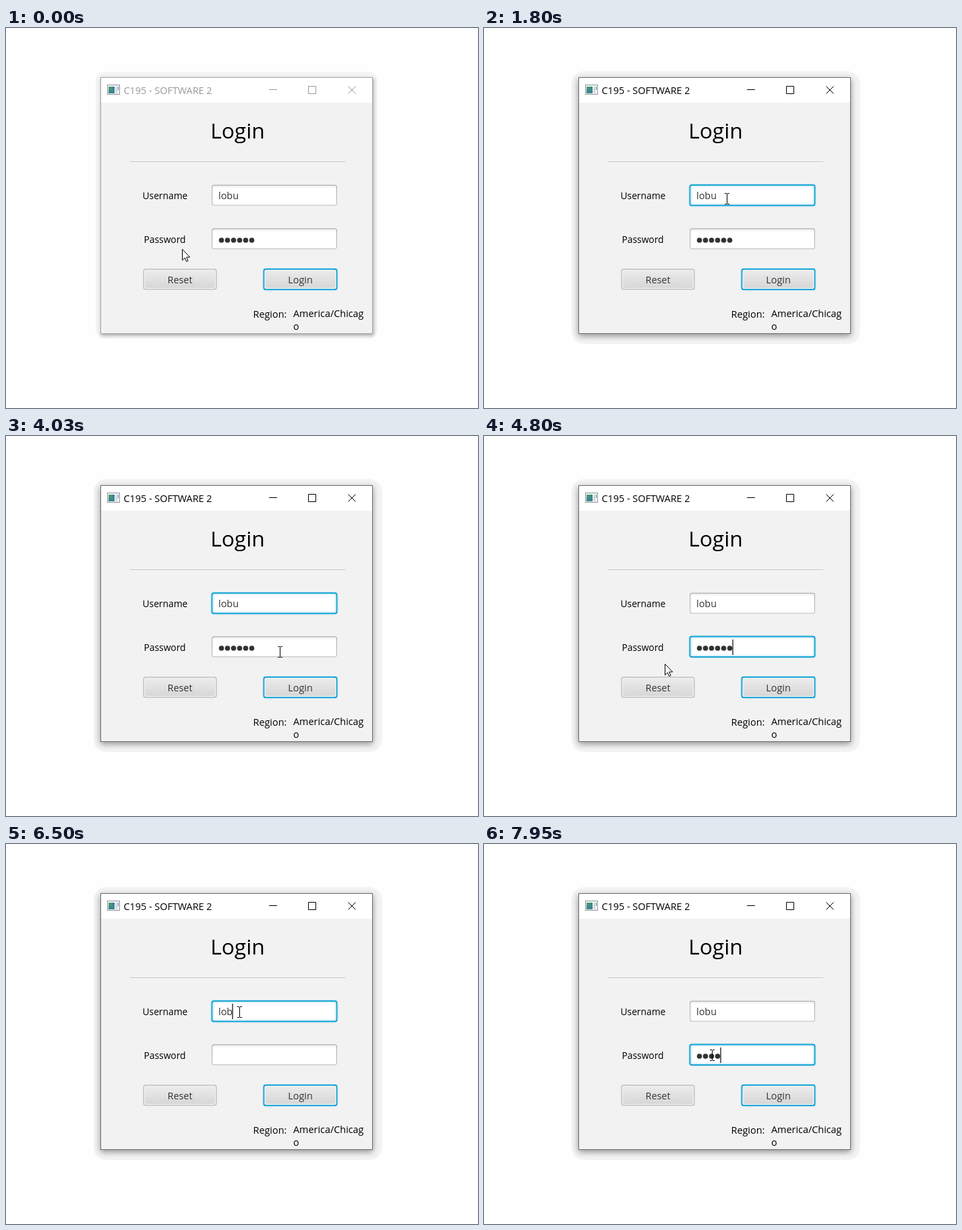
Animation of 700 by 564 pixels, one loop 8000 ms. Source, as an HTML page:

```html
<!DOCTYPE html>
<html lang="en">
<head>
<meta charset="utf-8">
<title>Login</title>
<style>
  html, body { margin: 0; width: 100%; height: 100%; overflow: hidden; background: #fefefe; }
  #stage { position: relative; width: 700px; height: 564px; overflow: hidden; }
  #band, #win { position: absolute; box-sizing: border-box; }
  #band { left: 133px; top: 65px; width: 418px; height: 396px; border-radius: 14px; background: #f4f4f4; }
  #win { left: 140px; top: 73px; width: 404px; height: 381px; border: 1px solid #a6a6a6;
    background: linear-gradient(#fff 37px, #f2f2f2 37px); box-shadow: 1px 2px 5px rgba(0, 0, 0, .34); }
  .active #band { left: 130px; top: 64px; width: 428px; height: 405px; border-radius: 19px; }
  .active #win { border-color: #6c6c6c; box-shadow: 0 3px 9px rgba(0, 0, 0, .42); }
  svg { position: absolute; left: 0; top: 0; display: block; }
  text { font-family: "Open Sans", "Noto Sans", sans-serif; font-size: 13.8px; white-space: pre; }
  .wide { font-size: 14.4px; }
  .ink { fill: #333; }
  .chrome { fill: #999; }
  .glyph { fill: none; stroke: #999; }
  .active .chrome { fill: #000; }
  .active .glyph { stroke: #000; }
</style>
</head>
<body>
<div id="stage">
  <div id="band"></div>
  <div id="win"></div>
  <svg width="700" height="564" viewBox="0 0 700 564">
    <defs>
      <linearGradient id="boxEdge" x2="0" y2="1"><stop stop-color="#b0b0b0"/><stop offset="1" stop-color="#c6c6c6"/></linearGradient>
      <linearGradient id="boxFill" x2="0" y2="1"><stop stop-color="#ececec"/><stop offset=".14" stop-color="#fff"/></linearGradient>
      <linearGradient id="btnFill" x2="0" y2="1"><stop stop-color="#ebebeb"/><stop offset="1" stop-color="#d7d7d7"/></linearGradient>
      <linearGradient id="btnHover" x2="0" y2="1"><stop stop-color="#f5f5f5"/><stop offset="1" stop-color="#e2e2e2"/></linearGradient>
    </defs>

    <g>
      <rect x="150.5" y="84.5" width="18" height="14" fill="#f4f6f7" stroke="#8d979d"/>
      <rect x="152" y="87" width="9" height="10" fill="#3f8790"/>
      <rect x="152" y="87" width="5" height="5" fill="#4a9a78"/>
      <rect x="162" y="87" width="3" height="10" fill="#d3dadd"/>
      <rect x="166" y="87" width="1" height="5" fill="#5a7f96"/>
    </g>
    <text class="chrome wide" x="174.5" y="98">C195 - SOFTWARE 2</text>
    <path class="glyph" d="M390 91.5h12M448.500 86.500h11v11h-11zM507.500 86.500l11 11M518.500 86.500l-11 11"/>

    <text x="343.500" y="164" text-anchor="middle" style="font-size:31.800px">Login</text>
    <path d="M184 198.500h319" stroke="#c3c3c3"/>
    <path d="M184 199.500h319" stroke="#fafafa"/>
    <text x="202.500" y="254">Username</text>
    <text x="204.500" y="319">Password</text>
    <text class="wide" x="366.500" y="430">Region:</text>
    <text class="wide" x="426" y="429">America/Chicag</text>
    <text class="wide" x="426" y="448">o</text>

    <g id="controls"></g>

    <rect id="sel" x="315" y="237" height="23" fill="#0096c9"/>
    <text id="user" class="wide" x="315" y="254"></text>
    <g id="dots" class="ink"></g>
    <rect id="caret" width="1.250" height="23" fill="#111"/>

    <path id="arrow" d="M.5.5V16.800L4.200 13.200 6.700 18.600 9 17.600 6.600 12.100H11.700Z" fill="#fff" stroke="#000"/>
    <path id="beam" d="M-3 -7.500h3M1 -7.500h3M.5 -7V8M-3 8.500h3M1 8.500h3" fill="none" stroke="#000"/>
  </svg>
</div>
<script>
const $ = id => document.getElementById(id);
const LOOP = 8000;
const NAME = 'lobu';

function add(parent, tag, attrs) {
  const el = document.createElementNS('http://www.w3.org/2000/svg', tag);
  for (const key in attrs) el.setAttribute(key, attrs[key]);
  return parent.appendChild(el);
}

// Rounded rectangle shrunk by `inset` on every side
function layer(g, [x, y, w, h], inset, rx, fill) {
  return add(g, 'rect', { x: x + inset, y: y + inset, width: w - 2 * inset, height: h - 2 * inset, rx, fill });
}

const FAINT = 'rgba(3,158,211,.14)';
const BLUE = '#039ed3';

function makeField(y) {
  const box = [305, y, 186, 31];
  const plain = add($('controls'), 'g', {});
  layer(plain, box, 0, 3.5, 'url(#boxEdge)');
  layer(plain, box, 1.25, 2.5, 'url(#boxFill)');
  const focus = add($('controls'), 'g', {});
  layer(focus, box, -.4, 3.5, BLUE);
  layer(focus, box, 1.25, 2.5, '#fff');
  layer(focus, box, -1.75, 5, FAINT);
  layer(focus, box, 3.5, 1, '#fff');
  return { plain, focus };
}

function makeButton(x, label) {
  const box = [x, 357.5, 109, 31];
  const g = $('controls');
  layer(g, [x, 358.5, 109, 31], 0, 3.5, '#fafafa');
  layer(g, box, 0, 3.5, '#b3b3b3');
  const focus = add(g, 'g', {});
  layer(focus, box, -.4, 3.5, BLUE);
  layer(g, box, 1.25, 2.5, '#f6f6f6');
  const body = layer(g, box, 2.5, 2, 'url(#btnFill)');
  const glow = layer(focus, box, -1.75, 5, FAINT);
  add(g, 'text', { x: x + 54.5, y: 379, 'text-anchor': 'middle', class: 'ink wide' }).textContent = label;
  return { focus, body, glow };
}

const fields = { user: makeField(232.75), pass: makeField(297.25) };
const reset = makeButton(203.5, 'Reset');
makeButton(382, 'Login');
const dots = Array.from({ length: 6 }, (_, i) =>
  add($('dots'), 'circle', { cx: 319.5 + 9 * i, cy: 315, r: 3.8 }));

const arrow = (x, y) => ({ shape: 'arrow', x, y });
const beam = (x, y) => ({ shape: 'beam', x, y });

// Each step lists only what changes at that time
const steps = [
  [0, { active: false, focus: '', typed: 4, dots: 6, caret: false, sel: false, hover: false, cursor: arrow(261, 328) }],
  [1350, { cursor: arrow(305, 294) }],
  [1500, { cursor: arrow(353, 264) }],
  [1650, { cursor: beam(360, 253) }],
  [1800, { active: true, focus: 'user' }],
  [1950, { sel: true, caret: true }],
  [2530, { caret: false }],
  [2690, { sel: false, typed: 1, caret: true }],
  [2810, { typed: 2 }],
  [2930, { typed: 3 }],
  [3050, { typed: 4 }],
  [3450, { cursor: arrow(332, 255) }],
  [3600, { caret: false, cursor: arrow(426, 337) }],
  [3750, { cursor: arrow(426, 332) }],
  [3890, { cursor: beam(416, 324) }],
  [4030, { cursor: beam(406, 320) }],
  [4150, { cursor: beam(400, 317) }],
  [4280, { focus: 'pass' }],
  [4550, { cursor: arrow(345, 331) }],
  [4670, { caret: true, cursor: arrow(300, 335) }],
  [4800, { cursor: arrow(268, 338) }],
  [4920, { hover: true, cursor: arrow(231, 360) }],
  [5070, { cursor: arrow(231, 364) }],
  [5220, { focus: 'reset', typed: 0, dots: 0, caret: false, hover: false, cursor: arrow(207, 349) }],
  [5370, { cursor: beam(346, 249) }],
  [5520, { focus: 'user' }],
  [5800, { caret: true }],
  [6230, { typed: 1 }],
  [6350, { typed: 2 }],
  [6500, { typed: 3 }],
  [6620, { typed: 4 }],
  [7050, { caret: false }],
  [7170, { cursor: arrow(336, 280) }],
  [7320, { cursor: beam(338, 313) }],
  [7440, { focus: 'pass' }],
  [7590, { caret: true, dots: 1 }],
  [7710, { dots: 2 }],
  [7830, { dots: 3 }],
  [7950, { dots: 4 }]
];

const show = (el, on) => { el.style.display = on ? '' : 'none'; };

function render(s) {
  $('stage').classList.toggle('active', s.active);
  for (const id in fields) {
    show(fields[id].focus, s.focus === id);
    show(fields[id].plain, s.focus !== id);
  }
  show(reset.focus, s.focus === 'reset');
  reset.body.setAttribute('fill', s.hover ? 'url(#btnHover)' : 'url(#btnFill)');

  const user = $('user');
  user.textContent = NAME.slice(0, s.typed);
  user.setAttribute('fill', s.sel ? '#fff' : '#333');
  const width = s.typed ? Math.round(user.getComputedTextLength()) : 0;
  show($('sel'), s.sel);
  $('sel').setAttribute('width', width);
  dots.forEach((dot, i) => show(dot, i < s.dots));

  const inPass = s.focus === 'pass';
  show($('caret'), s.caret);
  $('caret').setAttribute('x', (inPass ? 315 + 9 * s.dots : 315 + width) - .6);
  $('caret').setAttribute('y', inPass ? 302 : 237);

  for (const id of ['arrow', 'beam']) show($(id), s.cursor.shape === id);
  $(s.cursor.shape).setAttribute('transform', `translate(${s.cursor.x} ${s.cursor.y})`);
}

let state = {};
const timeline = steps.map(([at, change]) => ({ at, state: state = { ...state, ...change } }));

const start = performance.now();
let last = null;
function tick(now) {
  const t = Math.max(0, now - start) % LOOP;
  const current = timeline.findLast(step => step.at <= t);
  if (current !== last) render((last = current).state);
  requestAnimationFrame(tick);
}
tick(start);
</script>
</body>
</html>
```
